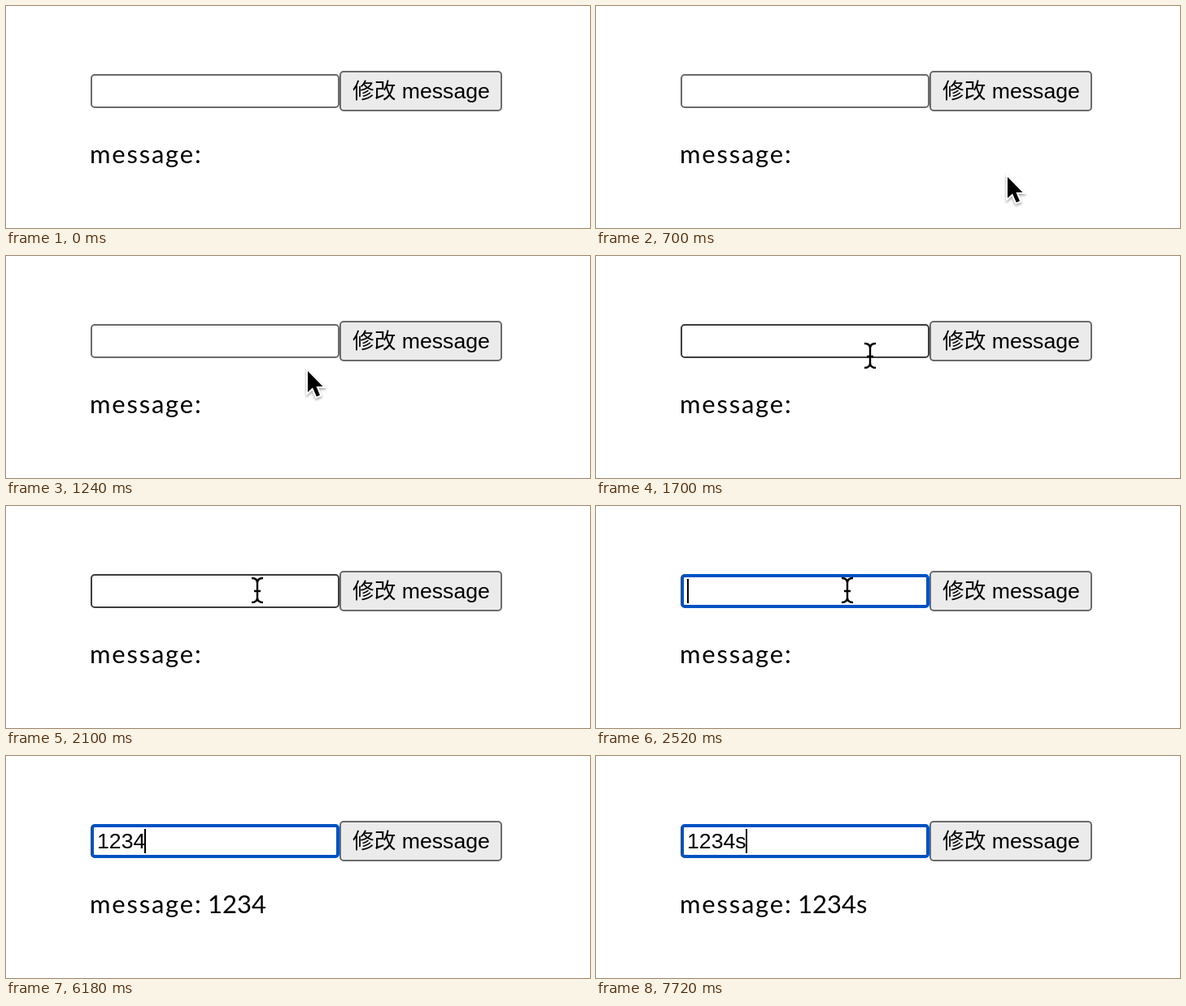
An HTML page for the animation above (8 s loop, 718x274 px).

```html
<!DOCTYPE html>
<html lang="zh-CN">
<head>
<meta charset="utf-8">
<title>message</title>
<style>
  html, body { margin: 0; width: 100%; height: 100%; overflow: hidden; background: #fff; }
  svg { display: block; width: 718px; height: 274px; }
  text { white-space: pre; }
  .control { font: 26.667px "Liberation Sans", Arial, "Noto Sans CJK SC", "Noto Sans CJK", sans-serif; }
  .label { font: 31px Lato, sans-serif; }
  #arrow { filter: drop-shadow(0 2px 1.5px rgba(0, 0, 0, .35)); }
</style>
</head>
<body>
<svg viewBox="0 0 718 274">
  <rect id="field" fill="#fff"/>
  <rect x="411" y="81" width="198" height="48" rx="4" fill="#ebebeb" stroke="#6b6b6b" stroke-width="2"/>
  <text class="control" x="426" y="114">修改 message</text>
  <text class="control" id="typed" x="112" y="114"></text>
  <rect id="caret" y="90" width="2" height="30"/>
  <text class="label" x="103" y="194" letter-spacing="1.8">message:</text>
  <text class="label" id="echo" x="248" y="194"></text>
  <path id="arrow" d="M0 0V26L6 20.5L10.8 31.5L15 29.7L10.4 19H18.5Z"
    stroke="#fff" stroke-width="4" paint-order="stroke"/>
  <path id="beam" d="M-7-15Q0-15 0-9Q0-15 7-15M0-9V9M-7 15Q0 15 0 9Q0 15 7 15M-4 1H4"
    fill="none" stroke="#000" stroke-width="2.4"/>
</svg>
<script>
const LOOP = 8000;
const FOCUS_AT = 2240;
const POINTER_HIDE_AT = 3340;
const FIELD_BOTTOM = 126;
const TEXT_LEFT = 112;

// Pointer waypoints: time, x, y
const path = [
  [300, 602, 266], [700, 506, 211], [820, 506, 211], [1100, 405, 164],
  [1240, 371, 142], [1260, 371, 142], [1400, 347, 130], [1560, 347, 130], [2100, 309, 104]
];
// Times at which each character reaches the field and the message
const fieldKeys = [3340, 4080, 5320, 6160, 7720];
const echoKeys = [3340, 4080, 5320, 6180, 7720];
const caretOff = [[5200, 5320], [7560, 7720]];

const [field, typed, caret, echo, arrow, beam] =
  ['field', 'typed', 'caret', 'echo', 'arrow', 'beam'].map(id => document.getElementById(id));

const set = (el, attrs) => Object.entries(attrs).forEach(([k, v]) => el.setAttribute(k, v));
const show = (el, on) => { el.style.display = on ? '' : 'none'; };
const textAt = (keys, t) => '1234s'.slice(0, keys.filter(k => k <= t).length);

function pointerAt(t) {
  const next = path.findIndex(p => p[0] > t);
  if (next < 0) return path[path.length - 1].slice(1);
  if (next === 0) return path[0].slice(1);
  const [t0, x0, y0] = path[next - 1];
  const [t1, x1, y1] = path[next];
  const f = (t - t0) / (t1 - t0);
  return [x0 + (x1 - x0) * f, y0 + (y1 - y0) * f];
}

function drawField(focused, hovered) {
  const line = focused ? 4 : 2;
  set(field, {
    x: 104 + line / 2, y: 84 + line / 2, width: 306 - line, height: 42 - line,
    rx: focused ? 3 : 4, 'stroke-width': line,
    stroke: focused ? '#0052c2' : hovered ? '#3d3d3d' : '#6b6b6b'
  });
}

function render(now) {
  const t = now % LOOP;
  const [x, y] = pointerAt(t);
  const visible = t >= 300 && t < POINTER_HIDE_AT;
  const inside = x < 410 && y < FIELD_BOTTOM;
  const focused = t >= FOCUS_AT;

  drawField(focused, inside);
  show(arrow, visible && !inside);
  show(beam, visible && inside);
  const place = `translate(${Math.round(x)} ${Math.round(y)})`;
  arrow.setAttribute('transform', place);
  beam.setAttribute('transform', place);

  typed.textContent = textAt(fieldKeys, t);
  echo.textContent = textAt(echoKeys, t);
  const width = typed.textContent ? typed.getComputedTextLength() : 0;
  caret.setAttribute('x', TEXT_LEFT + 2 * Math.floor(width / 2));
  show(caret, focused && !caretOff.some(([a, b]) => t >= a && t < b));
}

const start = performance.now();
function tick() {
  render(performance.now() - start);
  requestAnimationFrame(tick);
}
tick();
</script>
</body>
</html>
```
